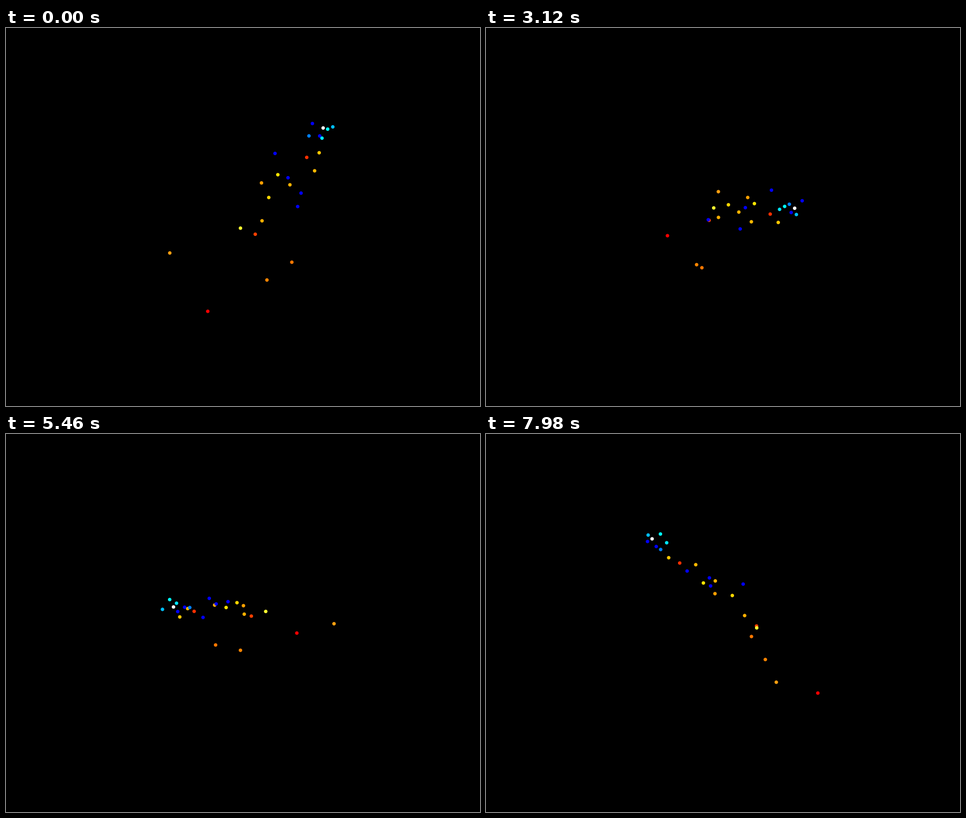
A matplotlib script that plays this animation: 837x669 px, repeating every 8 s.

```python
import numpy as np
import matplotlib.pyplot as plt
from matplotlib.animation import FuncAnimation

W, H, DPI = 837, 669, 64
LOOP_MS, FRAMES = 8000, 267
CX, CY = 435.9, 330.9           # projected centre of the cluster
ELEV = np.radians(30)           # camera height above the cluster's plane
DIST = 2784                     # camera distance in pixels
DOT = 6.2                       # dot diameter in pixels

BLUE = "#0000ff"

# colour, right and back at angle 0, height on screen
STARS = [
    (BLUE, 110.0, 148.0, 95.3),
    ("#ffffff", 129.5, 139.2, 91.0),
    ("#00ffff", 137.2, 123.7, 95.9),
    ("#00bfff", 147.6, 146.0, 90.0),
    ("#0080ff", 102.9, 124.3, 83.2),
    (BLUE, 122.9, 131.8, 79.7),
    ("#00e5ff", 126.4, 112.6, 84.4),
    (BLUE, 40.1, 79.0, 72.1),
    ("#ff3000", 97.8, 89.9, 59.8),
    ("#ffc800", 121.1, 109.1, 59.3),
    ("#ffb900", 111.1, 60.1, 49.6),
    ("#ffe600", 44.8, 49.7, 47.5),
    (BLUE, 62.8, 37.9, 47.7),
    ("#ffa000", 15.4, 30.7, 41.9),
    ("#ffb400", 66.0, 27.1, 40.3),
    (BLUE, 86.0, 34.4, 21.9),
    ("#ffd700", 28.1, -1.0, 31.4),
    (BLUE, 78.5, -24.2, 26.9),
    ("#ffb000", 16.1, -22.1, 0.8),
    ("#ffff30", -21.6, -40.5, -2.8),
    ("#ff4000", 4.2, -42.3, -12.5),
    ("#ffa010", -143.8, -63.5, -34.2),
    ("#ff7800", 68.0, -38.4, -63.4),
    ("#ff8500", 24.4, -59.7, -83.1),
    ("#ff0000", -76.1, -142.0, -92.0),
]
COLORS = np.array([star[0] for star in STARS])
RIGHT, BACK, RISE = np.array([star[1:] for star in STARS]).T


def project(deg):
    """Screen positions and closeness of all stars after a turn by deg."""
    a = np.radians(deg)
    side = RIGHT * np.cos(a) + BACK * np.sin(a)
    front = RIGHT * np.sin(a) - BACK * np.cos(a)
    zoom = 1 / (1 - front * np.cos(ELEV) / DIST)
    x = CX + zoom * side
    y = CY + zoom * (front * np.sin(ELEV) - RISE)
    near = front * np.cos(ELEV) + RISE * np.tan(ELEV)
    return np.column_stack([x, y]), near


fig = plt.figure(figsize=(W / DPI, H / DPI), dpi=DPI, facecolor="black")
ax = fig.add_axes([0, 0, 1, 1])
ax.set_xlim(0, W)
ax.set_ylim(H, 0)
ax.axis("off")
dots = ax.scatter(RIGHT, BACK, s=(DOT * 72 / DPI) ** 2, c=COLORS, linewidths=0)


def draw(frame):
    # one degree per frame, far stars first
    points, near = project(frame)
    order = np.argsort(near)
    dots.set_offsets(points[order])
    dots.set_facecolor(COLORS[order])
    return (dots,)


anim = FuncAnimation(fig, draw, frames=FRAMES, interval=LOOP_MS / FRAMES,
                     init_func=lambda: draw(0), repeat=True, repeat_delay=0)
plt.show()
```
